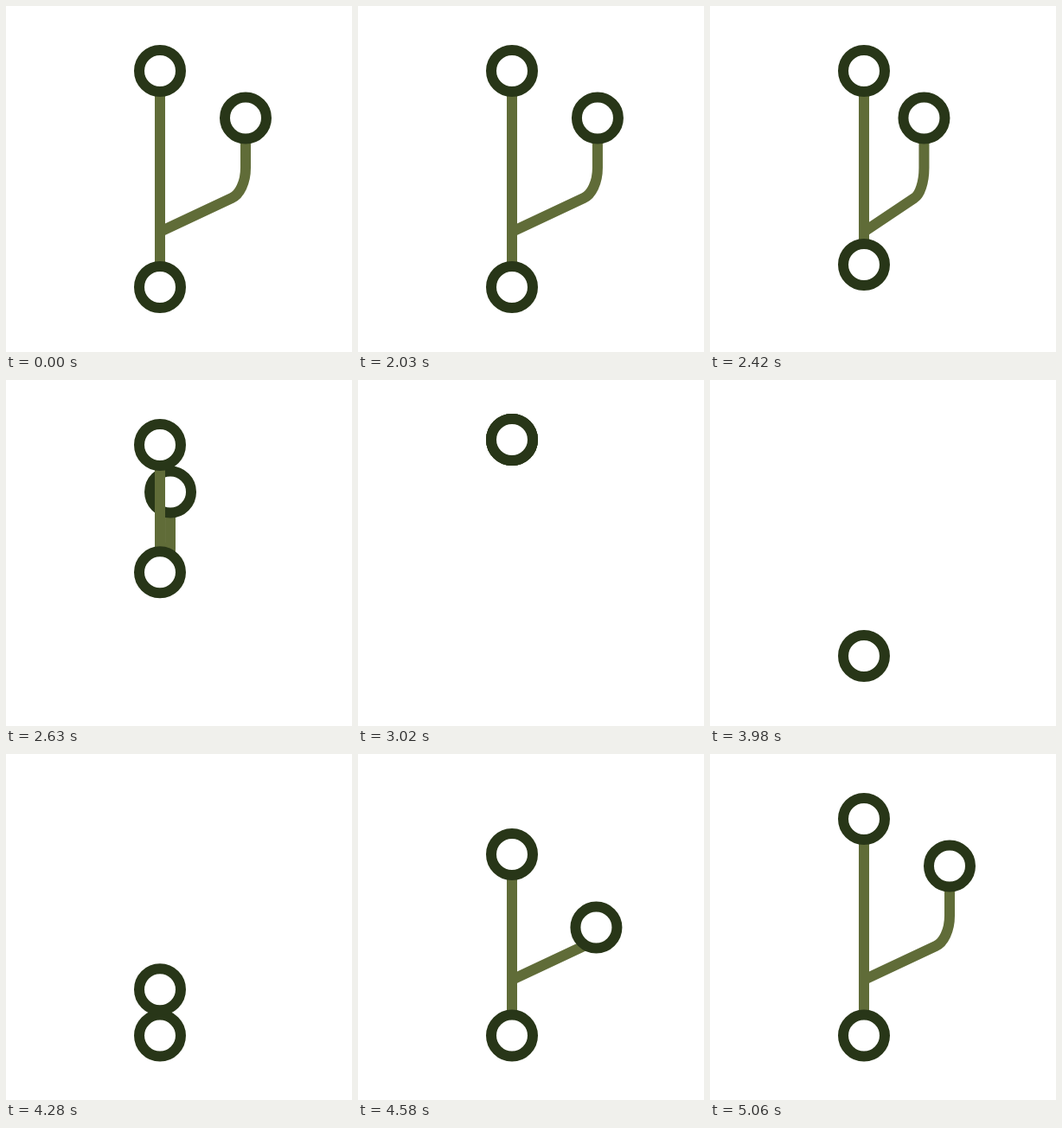
Write an HTML page with a canvas that moves like this. It is 400x400 px and loops after 5120 ms.

```html
<!DOCTYPE html>
<html lang="en">
<head>
<meta charset="utf-8">
<title>Branch icon</title>
<style>
  html, body { margin: 0; width: 100%; height: 100%; overflow: hidden; background: #fff; }
  canvas { display: block; width: 400px; height: 400px; }
</style>
</head>
<body>
<canvas id="stage" width="400" height="400"></canvas>
<script>
const LOOP = 5120;
const DARK = '#283618', OLIVE = '#606c38';
const X = 178, TOP = 75, LOW = 325, FORK = 261, SIDE_Y = 129.5, PEAK = 56;
const RADIUS = 24, WEIGHT = 12;
const ctx = document.getElementById('stage').getContext('2d');

const clamp = v => Math.min(1, Math.max(0, v));
const mix = (a, b, k) => a + (b - a) * k;

// Steep symmetric ease: cubic-bezier(.75, 0, .25, 1)
function ease(x) {
  if (x <= 0 || x >= 1) return clamp(x);
  let lo = 0, hi = 1, s = 0.5;
  for (let i = 0; i < 24; i++) {
    s = (lo + hi) / 2;
    const u = 1 - s;
    const at = 3 * u * u * s * 0.75 + 3 * u * s * s * 0.25 + s * s * s;
    if (at < x) lo = s; else hi = s;
  }
  return s * s * (3 - 2 * s);
}
const step = (t, start, span) => ease((t - start) / span);

// Branch outline, squeezed towards the stem by k
function branchPath(k) {
  const x = v => X + (v - X) * k;
  return `M${X} ${FORK} L${x(261)} 222 C${x(270)} 218 ${x(277)} 204 ${x(277)} 187 V${SIDE_Y}`;
}
const track = document.createElementNS('http://www.w3.org/2000/svg', 'path');
track.setAttribute('d', branchPath(1));
const trackLength = track.getTotalLength();

function ring(x, y, r) {
  if (r < 0.3) return;
  ctx.beginPath();
  ctx.arc(x, y, r, 0, 2 * Math.PI);
  ctx.fillStyle = '#fff';
  ctx.fill();
  ctx.strokeStyle = DARK;
  ctx.stroke();
}

function stem(from, to) {
  ctx.strokeStyle = OLIVE;
  ctx.beginPath();
  ctx.moveTo(X, from);
  ctx.lineTo(X, to);
  ctx.stroke();
}

function branch(k, dash) {
  ctx.strokeStyle = OLIVE;
  ctx.setLineDash(dash);
  ctx.stroke(new Path2D(branchPath(k)));
  ctx.setLineDash([]);
}

// The low ring rises and sweeps up the others, then all shrink away
function collapse(t) {
  const low = mix(LOW, PEAK, step(t, 2006, 1333));
  const k = 1 - step(t, 2000, 953);
  const r = RADIUS * (1 - step(t, 3331, 460));
  const top = Math.min(TOP, low);
  if (low > SIDE_Y) {
    ctx.save();
    ctx.beginPath();
    ctx.rect(0, 0, 400, low);
    ctx.clip();
    branch(k, []);
    ctx.restore();
  }
  ring(mix(X, 277, k), Math.min(SIDE_Y, low), r);
  if (low > top) stem(top, low);
  ring(X, top, r);
  ring(X, low, r);
}

// A new ring grows, climbs, and sends a second one along the branch
function expand(t) {
  const base = LOW + 0.6;
  const top = mix(LOW, TOP, step(t, 3745, 1333));
  const along = 1 - Math.pow(1 - clamp((t - 4308) / 760), 2.2);
  if (along > 0) {
    const d = along * trackLength;
    const p = track.getPointAtLength(d);
    branch(1, [d, 999]);
    ring(p.x, p.y, RADIUS);
  }
  if (t > 3745) stem(top, base);
  ring(X, base, RADIUS * step(t, 3770, 530));
  ring(X, top, RADIUS * step(t, 3215, 800));
}

function draw(t) {
  ctx.clearRect(0, 0, 400, 400);
  ctx.lineWidth = WEIGHT;
  if (t < 3800) collapse(t);
  if (t > 3215) expand(t);
}

const begin = performance.now();
function tick() {
  draw((performance.now() - begin) % LOOP);
  requestAnimationFrame(tick);
}
tick();
</script>
</body>
</html>
```
